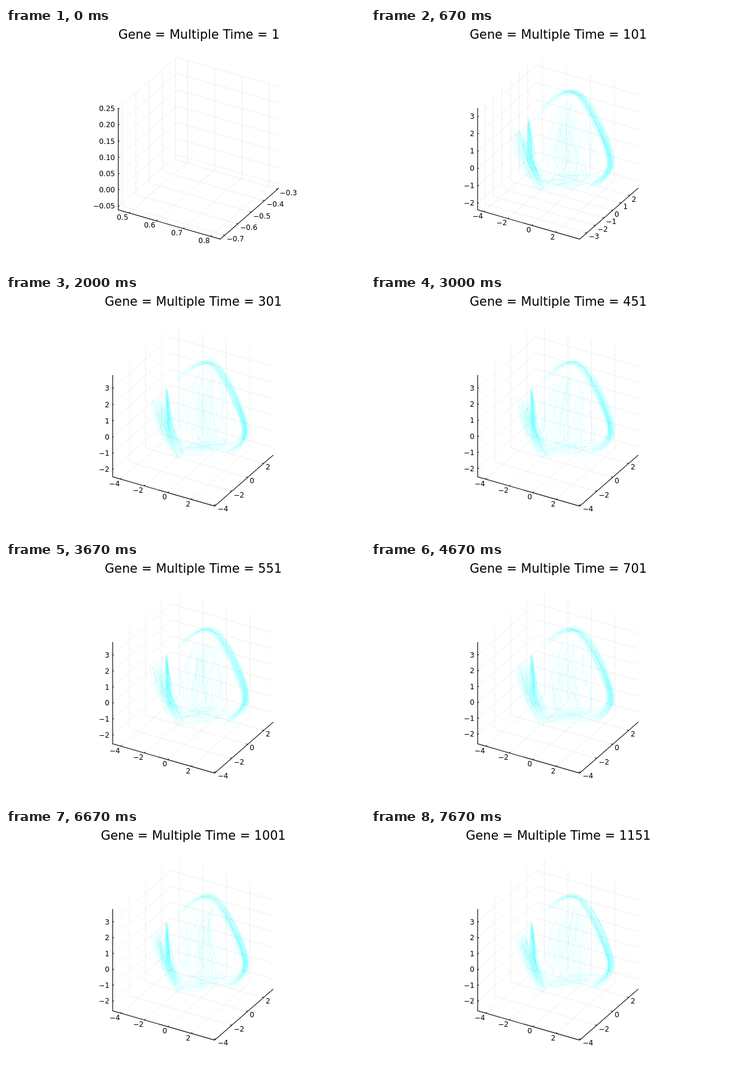
These frames come from a looping animation (600x400 px, 8 s). An HTML page with a canvas:

```html
<!DOCTYPE html>
<html lang="en">
<head>
<meta charset="utf-8">
<title>Trajectories</title>
<style>
  html, body { margin: 0; width: 100%; height: 100%; overflow: hidden; background: #fff; }
  canvas, svg { position: absolute; left: 0; top: 0; width: 600px; height: 400px; }
  text { font-family: "DejaVu Sans", sans-serif; font-size: 12px; fill: #000; }
  .title { font-size: 20.8px; text-anchor: middle; }
  .grid { stroke: #000; stroke-opacity: .07; fill: none; }
  .axis { stroke: #000; stroke-width: 1.1; fill: none; }
</style>
</head>
<body>
<canvas id="cloud" width="600" height="400"></canvas>
<svg id="plot" viewBox="0 0 600 400"></svg>
<script>
const LOOP = 8000, STEPS = 24;
const ctx = document.getElementById('cloud').getContext('2d');
const plot = document.getElementById('plot');

// Edges of the plot box on screen
const EX = [170.5, 49], EY = [98, -85.5], EZ = [0, -170.5];

// Strand bundles: key points [x, y, spread] and how much each end may be cut off
const BUNDLES = [
  { n: 95, cutA: 3.4, cutB: .9, pts: [[282, 150, 8], [316, 119, 8], [349, 117, 11], [383, 172, 12], [400, 234, 10], [366, 270, 19]] },
  { n: 95, cutA: .7, cutB: .6, pts: [[252, 172, 16], [268, 222, 19], [293, 276, 15]] },
  { n: 70, cutA: .6, cutB: 1.5, pts: [[268, 155, 2], [271, 195, 7], [275, 232, 11], [298, 264, 24]] },
  { n: 70, cutA: 1, cutB: .8, pts: [[340, 124, 26], [328, 180, 55], [330, 230, 66], [330, 262, 62]] },
  { n: 45, cutA: 1, cutB: 1, pts: [[288, 262, 26], [330, 256, 28], [392, 248, 20]] }
];

function random(seed) {
  let s = seed >>> 0;
  return () => {
    s = (s + 0x6D2B79F5) >>> 0;
    let t = Math.imul(s ^ (s >>> 15), 1 | s);
    t ^= t + Math.imul(t ^ (t >>> 7), 61 | t);
    return ((t ^ (t >>> 14)) >>> 0) / 4294967296;
  };
}

const ramp = (k, from, to) => Math.min(1, Math.max(0, (k - from) / (to - from)));

// Axis ranges widen as the trajectories reach new extremes
function ranges(k) {
  if (k === 0) return { x: [.4606, .8358, .1], y: [-.7332, -.2907, .1], z: [-.0619, .2512, .05] };
  const wide = ramp(k, 3, 5);
  return {
    x: [-4.51 - .19 * ramp(k, 2, 7), 3.995, 2],
    y: [-3.816 - .316 * wide, 2.987 + .22 * wide, wide < 1 ? 1 : 2],
    z: [-2.397 - .227 * ramp(k, 2, 14), 3.485 + .325 * ramp(k, 2, 5), 1]
  };
}

// [fraction along the edge, text] for each tick
function ticks([lo, hi, step]) {
  const digits = step >= 1 ? 0 : step < .1 ? 2 : 1, list = [];
  for (let i = Math.ceil(lo / step); i * step <= hi; i++) {
    const s = (i * step).toFixed(digits).replace('-', '\u2212');
    list.push([(i * step - lo) / (hi - lo), s]);
  }
  return list;
}

function drawPlot(k) {
  const { x, y, z } = ranges(k), ox = k ? 178.2 : 187.6;
  const at = (a, b, c) => [0, 1].map(i => (i ? 304.4 : ox) + a * EX[i] + b * EY[i] + c * EZ[i]);
  const path = (...pts) => 'M' + pts.map(p => p.map(v => v.toFixed(2)).join(' ')).join('L');
  const text = (px, py, s, anchor) =>
    `<text x="${px.toFixed(2)}" y="${py.toFixed(2)}" text-anchor="${anchor}">${s}</text>`;
  let grid = '', axis = path(at(0, 0, 1), at(0, 0, 0), at(1, 0, 0), at(1, 1, 0)), words = '';

  for (const [f, s] of ticks(x)) {
    const p = at(f, 0, 0);
    grid += path(p, at(f, 1, 0), at(f, 1, 1));
    axis += path(p, at(f, .018, 0));
    words += text(p[0] - 1.2, p[1] + 11.6, s, 'end');
  }
  for (const [f, s] of ticks(y)) {
    const p = at(1, f, 0);
    grid += path(p, at(0, f, 0), at(0, f, 1));
    axis += path(p, at(.985, f, 0));
    words += text(p[0] + 3.3, p[1] + 10.2, s, 'start');
  }
  for (const [f, s] of ticks(z)) {
    const p = at(0, 0, f);
    grid += path(p, at(0, 1, f), at(1, 1, f));
    axis += path(p, [p[0] + 2, p[1]]);
    words += text(p[0] - 5.4, p[1] + 4.5, s, 'end');
  }
  plot.innerHTML = `<path class="grid" d="${grid}"/><path class="axis" d="${axis}"/>${words}` +
    `<text class="title" x="${ox + 134.8}" y="18">Gene = Multiple Time = ${1 + 50 * k}</text>`;
}

// Smooth curve through the key points
function pointOn(pts, s) {
  const i = Math.min(Math.floor(s), pts.length - 2), f = s - i;
  const a = pts[Math.max(i - 1, 0)], b = pts[i], c = pts[i + 1], d = pts[Math.min(i + 2, pts.length - 1)];
  return b.map((v, j) => v + .5 * f * (c[j] - a[j] +
    f * (2 * a[j] - 5 * v + 4 * c[j] - d[j] + f * (3 * (v - c[j]) + d[j] - a[j]))));
}

function drawCloud(k) {
  ctx.setTransform(1, 0, 0, 1, 0, 0);
  ctx.clearRect(0, 0, 600, 400);
  if (k === 0) return;
  const rnd = random(k * 977 + 5);
  const spread = () => rnd() + rnd() - 1;
  const grow = .035 * (1 - ramp(k, 2, 6));
  ctx.setTransform(1 + grow, 0, 0, 1 + grow, -408 * grow, -284 * grow);
  ctx.strokeStyle = 'rgba(0,255,255,.06)';
  ctx.lineWidth = 1;
  for (const { n, pts, cutA, cutB } of BUNDLES) {
    for (let i = 0; i < n; i++) {
      const from = rnd() * cutA, to = pts.length - 1 - rnd() * cutB;
      let dx = spread(), dy = spread() * .6;
      ctx.beginPath();
      for (let s = from; s <= to; s += .2) {
        const [px, py, w] = pointOn(pts, s);
        ctx.lineTo(px + dx * w, py + dy * w);
        dx = dx * .97 + spread() * .13;
        dy = dy * .97 + spread() * .13;
      }
      ctx.stroke();
    }
  }
}

let shown = -1;
const start = performance.now();
function tick(now) {
  const t = Math.max(0, now - start) % LOOP;
  const k = Math.floor((t + 4) * STEPS / LOOP) % STEPS;
  if (k !== shown) {
    shown = k;
    drawPlot(k);
    drawCloud(k);
  }
  requestAnimationFrame(tick);
}
tick(start);
</script>
</body>
</html>
```
